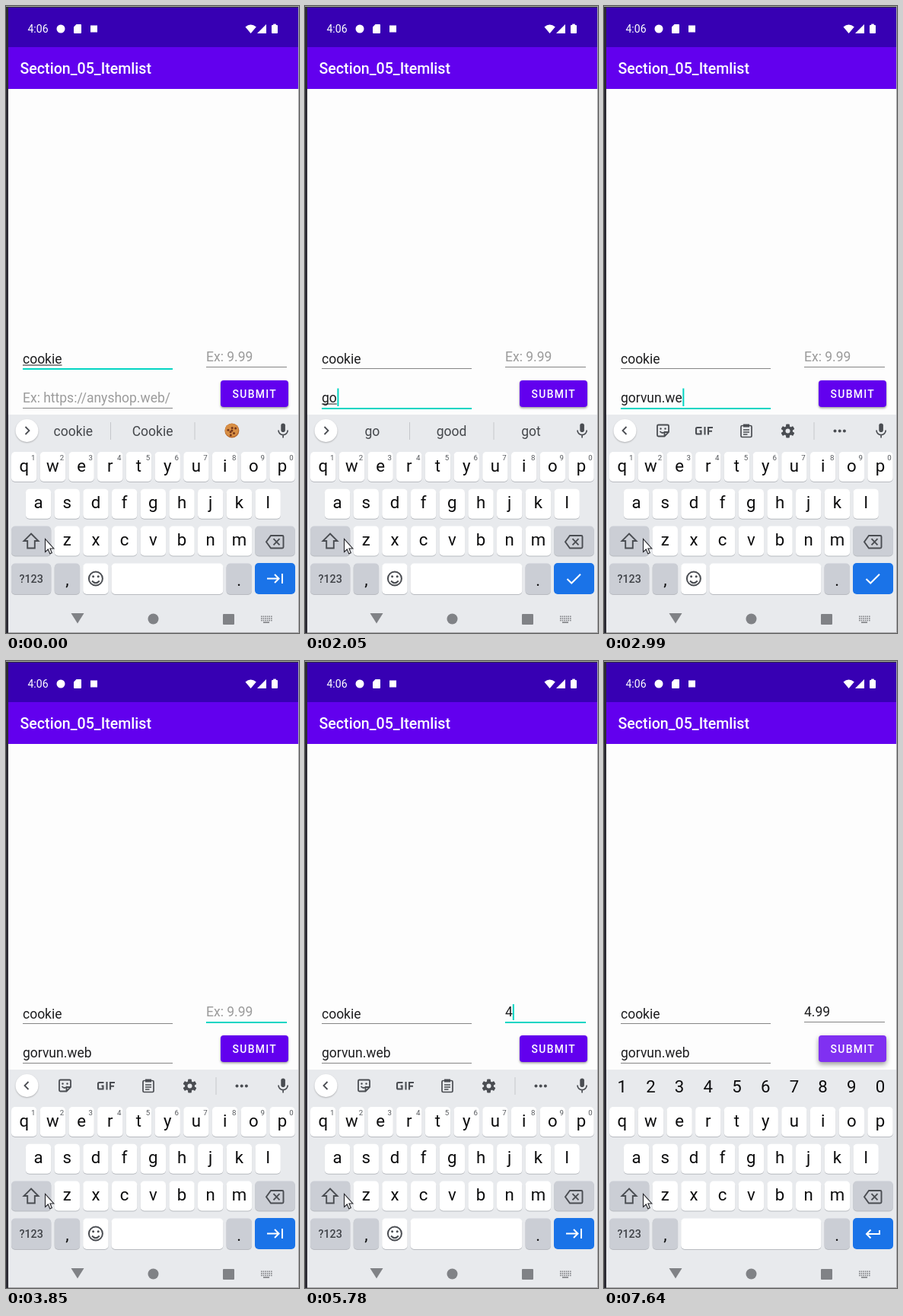
These frames come from a looping animation (385x824 px, 8000 ms). An HTML page with a canvas:

```html
<!DOCTYPE html>
<html lang="en">
<head>
<meta charset="utf-8">
<title>Item list</title>
<style>
html, body { margin: 0; width: 100%; height: 100%; overflow: hidden; background: #fdfdfd; }
canvas { display: block; width: 385px; height: 824px; }
</style>
</head>
<body>
<canvas id="stage"></canvas>
<script>
const W = 385, H = 824, LOOP = 8000;
const canvas = document.getElementById('stage');
const ctx = canvas.getContext('2d');
const dpr = window.devicePixelRatio || 1;
canvas.width = W * dpr;
canvas.height = H * dpr;

const INK = '#1d1d1f', ICON = '#4a4d52', HINT = '#9b9b9b', TEAL = '#03d5c3';
const PURPLE = '#6200ee', PANEL = '#e8eaed', DARK_KEY = '#cbced5', BLUE = '#1a73e8';
const LINK = 'gorvun.web';

// Each step changes part of the state; "words" null shows the toolbar.
const steps = [
  [0, { focus: 'name', link: '', price: '', caret: false, mark: 6, keys: 'next', words: ['cookie', 'Cookie', null] }],
  [500, { caret: true }],
  [1060, { focus: 'link', mark: 0, words: null, keys: 'done' }],
  [1620, { caret: false }],
  [1900, { caret: true, link: LINK.slice(0, 1) }],
  [2050, { link: LINK.slice(0, 2), mark: 2, words: ['go', 'good', 'got'] }],
  [2200, { link: LINK.slice(0, 3), mark: 2, words: ['gor', 'gore', 'gorge'] }],
  [2320, { link: LINK.slice(0, 4), mark: 3 }],
  [2440, { link: LINK.slice(0, 5), mark: 4, words: ['gorv', 'gorvun', 'gorge'] }],
  [2560, { link: LINK.slice(0, 6), mark: 5, words: ['gorvu', 'gorvun', 'Gorvun'] }],
  [2710, { link: LINK.slice(0, 7), mark: 6, words: ['gorvun', 'Gorvun', 'Gorvuns'] }],
  [2990, { link: LINK.slice(0, 9), mark: 0, words: null }],
  [3140, { link: LINK }],
  [3290, { focus: 'price' }],
  [3440, { keys: 'next' }],
  [3850, { caret: false }],
  [4280, { caret: true }],
  [4830, { caret: false }],
  [5380, { caret: true }],
  [5780, { price: '4' }],
  [5900, { price: '4.' }],
  [6370, { caret: false }],
  [6970, { caret: true, price: '4.9' }],
  [7090, { price: '4.99' }],
  [7520, { focus: 'submit' }],
  [7640, { keys: 'enter' }]
];

function stateAt(t) {
  const s = {};
  for (const [at, change] of steps) if (at <= t) Object.assign(s, change);
  return s;
}

const font = (size, weight = 400) => `${weight} ${size}px Roboto, sans-serif`;

function text(str, x, y, size, color, align = 'left', weight = 400) {
  ctx.font = font(size, weight);
  ctx.textAlign = align;
  ctx.fillStyle = color;
  ctx.fillText(str, x, y);
}

function rect(x, y, w, h, color) {
  ctx.fillStyle = color;
  ctx.fillRect(x, y, w, h);
}

function round(x, y, w, h, r, color) {
  ctx.beginPath();
  ctx.roundRect(x, y, w, h, r);
  ctx.fillStyle = color;
  ctx.fill();
}

function disc(x, y, r, color) {
  ctx.beginPath();
  ctx.arc(x, y, r, 0, 7);
  ctx.fillStyle = color;
  ctx.fill();
}

function shape(d, color) {
  ctx.fillStyle = color;
  ctx.fill(new Path2D(d));
}

function line(d, color, width = 2) {
  ctx.strokeStyle = color;
  ctx.lineWidth = width;
  ctx.stroke(new Path2D(d));
}

function shadow(color, blur, dy) {
  ctx.shadowColor = color;
  ctx.shadowBlur = blur * dpr;
  ctx.shadowOffsetY = dy * dpr;
}

const noShadow = () => shadow('transparent', 0, 0);

function drawBars() {
  rect(0, 0, W, H, '#fdfdfd');
  rect(3, 2, 382, 52, '#3700b3');
  rect(3, 54, 382, 55, PURPLE);
  text('4:06', 28.5, 35, 14, '#fff');
  disc(72, 30, 5.5, '#fff');
  shape('M92.5 24H98q1 0 1 1v10q0 1-1 1H90q-1 0-1-1V27.500Z', '#fff');
  rect(111, 25.5, 9, 9, '#fff');
  shape('M314.500 27.500Q321.500 21.500 328.800 27.500L321.600 36Z', '#fff');
  shape('M342 24V36H330Z', '#fff');
  round(349, 25, 8, 11, 1, '#fff');
  rect(351.2, 23.6, 3.6, 2, '#fff');
  text('Section_05_Itemlist', 18.5, 89, 19.6, '#fff', 'left', 500);
}

const fields = {
  name: { x: 22, base: 470, end: 219, rule: 476, top: 451.5, tall: 23.5, pad: 0.6, hint: '' },
  link: { x: 22, base: 521, end: 219, rule: 528, top: 502.5, tall: 23.5, pad: 0.6, hint: 'Ex: https://anyshop.web/' },
  price: { x: 263, base: 467, end: 369, rule: 474, top: 451, tall: 21, pad: 0, hint: 'Ex: 9.99' }
};

function drawField(key, value, s) {
  const f = fields[key], active = s.focus === key;
  ctx.save();
  ctx.beginPath();
  ctx.rect(f.x, f.top - 4, f.end - f.x, 36);
  ctx.clip();
  text(value || f.hint, f.x, f.base, 17.5, value ? INK : HINT);
  const span = str => ctx.measureText(str).width;
  const full = span(value), marked = span(value.slice(0, s.mark));
  ctx.restore();
  if (active) rect(f.x, f.rule, f.end - f.x, 2, TEAL);
  else rect(f.x, f.rule, f.end - f.x, 1, '#858585');
  if (!active) return;
  if (s.mark) rect(f.x, f.base + 1.5, marked, 1, INK);
  if (s.caret) rect(f.x + f.pad + full, f.top, 2, f.tall, TEAL);
}

function drawSubmit(lit) {
  shadow('rgba(0,0,0,.4)', lit ? 6 : 3, lit ? 3 : 1.5);
  round(282, 492, 89, 35, 4, lit ? '#8030f1' : PURPLE);
  noShadow();
  ctx.letterSpacing = '1.3px';
  text('SUBMIT', 297.6, 515, 13.9, '#fff', 'left', 500);
  ctx.letterSpacing = '0px';
}

function key(x, y, w, color = '#fff', h = 39) {
  round(x, y + 1, w, h, 5, '#b8bbc0');
  round(x, y, w, h, 5, color);
}

const keyX = i => 23.7 + i * 37.7;

function drawMic() {
  round(361.3, 548.5, 5.6, 11.5, 2.8, ICON);
  line('M358 557.500a6.100 6.100 0 0 0 12.200 0M364.100 563.500V567.500', ICON, 1.7);
}

function drawCookie(x, y) {
  disc(x, y, 9.5, '#b8682c');
  disc(x - 0.3, y - 0.6, 8.7, '#d88f45');
  for (let i = 0; i < 7; i++) {
    const a = i * 2.4, r = 2.5 * Math.sqrt(i);
    disc(x + r * Math.cos(a), y + r * Math.sin(a), 1.5, '#74361b');
  }
}

function drawStrip(words) {
  shadow('rgba(0,0,0,.25)', 2, 1);
  disc(27.5, 558, 15, '#fff');
  noShadow();
  line(words ? 'M25.500 553L30.500 558L25.500 563' : 'M29.500 553L24.500 558L29.500 563', ICON, 1.8);
  drawMic();
  if (words) {
    rect(137, 547, 1, 23, '#c5c7cb');
    rect(247.5, 547, 1, 23, '#c5c7cb');
    words.forEach((word, i) => {
      const x = 88.3 + i * 104.3;
      if (word) text(word, x, 565, 17.5, '#45484c', 'center');
      else drawCookie(x, 558);
    });
    return;
  }
  // sticker
  line('M71.500 550.500H83.500q1.500 0 1.500 1.500V560L79.500 565.500H71.500q-1.500 0-1.500-1.500V552q0-1.500 1.500-1.500ZM85 560H81q-1.500 0-1.500 1.500V565.500M73.500 559q3.500 4 7 0', ICON, 1.8);
  disc(74.5, 555.5, 1.2, ICON);
  disc(80.5, 555.5, 1.2, ICON);
  // animated picture button
  line('M128.500 554H122.500q-1.500 0-1.500 1.500V561q0 1.500 1.500 1.500H127.500V558.500H125.500M132.500 553V563.500M137 563.500V554H143M137 558.700H142', ICON, 2.1);
  // clipboard
  line('M181.500 551.500H192.500q1.500 0 1.500 1.500V565q0 1.500-1.500 1.500H181.500q-1.500 0-1.500-1.500V553q0-1.500 1.500-1.500ZM183 557H191M183 560H191M183 563H188.500', ICON, 1.7);
  rect(183, 549.5, 8, 4, ICON);
  // gear
  for (let i = 0; i < 6; i++) {
    ctx.save();
    ctx.translate(241.5, 558.5);
    ctx.rotate(i * Math.PI / 3);
    round(-2.4, -9, 4.8, 6, 1, ICON);
    ctx.restore();
  }
  disc(241.5, 558.5, 6.5, ICON);
  disc(241.5, 558.5, 3, PANEL);
  rect(275.5, 547, 1, 23, '#c5c7cb');
  for (const x of [303.5, 309.7, 315.9]) disc(x, 558.5, 2, ICON);
}

function drawAction(kind) {
  round(327, 732, 53, 41, 5, BLUE);
  line({
    next: 'M343 752.500H358.500M353 747L358.500 752.500L353 758M363 746V759',
    done: 'M344.500 753L350.200 758.500L362 746.800',
    enter: 'M362 748V753H345.500M350.500 747.500L345 753L350.500 758.500'
  }[kind], '#fff', 2);
}

function drawKeyboard(s) {
  const plain = s.keys === 'enter';
  rect(3, 537, 382, 287, PANEL);
  if (!plain) drawStrip(s.words);

  const label = (c, x, y) => text(c, x, y, 22.2, '#0c0c0d', 'center');
  const row = (letters, first, y) => [...letters].forEach((c, i) => {
    const x = keyX(first + i);
    key(x - 16.7, y, 33.4);
    label(c, x, Math.floor(y + 26));
  });
  row('qwertyuiop', 0, 586);
  row('asdfghjkl', 0.5, 634.7);
  row('zxcvbnm', 1.5, 683.5);
  [...'1234567890'].forEach((d, i) => {
    if (plain) label(d, keyX(i), 567);
    else text(d, keyX(i) + 12, 596.5, 9.7, '#55585c', 'center');
  });

  key(7, 683.5, 52.3, DARK_KEY);
  line('M33 693.500L42.500 703H37.800V712.500H28.200V703H23.500Z', ICON, 1.9);
  key(327.3, 683.5, 52.5, DARK_KEY);
  line('M348 696H363q1.500 0 1.500 1.500V711q0 1.500-1.500 1.500H348L342 704.250ZM351.500 700.200L359.500 708.300M359.500 700.200L351.500 708.300', ICON, 1.9);

  key(7, 732.5, 52.3, DARK_KEY, 40.5);
  text('?123', 33.2, 758, 14.3, '#3f4247', 'center', 500);
  key(63.7, 732.5, 33.4, DARK_KEY, 40.5);
  label(',', 80.5, 761);
  if (plain) {
    key(101.2, 732.5, 184.2, '#fff', 40.5);
  } else {
    key(101.2, 732.5, 33.4, '#fff', 40.5);
    line('M126.900 752.500a9 9 0 1 1-18 0a9 9 0 1 1 18 0M113 755.500q4.900 5.500 9.800 0', ICON, 2);
    disc(114.6, 749.7, 1.5, ICON);
    disc(121.2, 749.7, 1.5, ICON);
    key(138.5, 732.5, 146.9, '#fff', 40.5);
  }
  key(289.6, 732.5, 33.4, DARK_KEY, 40.5);
  label('.', 306.3, 762);
  drawAction(s.keys);
}

function drawNav() {
  const grey = '#808286';
  shape('M85.500 798H102.500L94 811.500Z', grey);
  disc(193.5, 805.5, 7, grey);
  round(285, 799, 15, 14, 1, grey);
  for (let r = 0; r < 3; r++)
    for (let c = 0; c < 6; c++) rect(335 + c * 2.6, 801.5 + r * 2.6, 1.6, 1.6, grey);
  rect(338, 809.3, 8, 1.6, grey);
}

function drawPointer() {
  const d = 'M51.500 700.500V717.500L55.300 714L57.700 719.800L60.300 718.700L57.900 713H62.800Z';
  shape(d, '#fff');
  line(d, '#26262b', 1.1);
}

function drawEdges() {
  const frame = '#a8a8ab';
  rect(0, 0, W, 2, '#32313a');
  rect(0, 0, W, 1, frame);
  rect(0, 1, 3, H, '#2c2b33');
  rect(384, 0, 1, H, frame);
  rect(3, 823, 382, 1, frame);
}

function draw(now) {
  const s = stateAt(now % LOOP);
  ctx.setTransform(dpr, 0, 0, dpr, 0, 0);
  drawBars();
  drawField('name', 'cookie', s);
  drawField('price', s.price, s);
  drawField('link', s.link, s);
  drawSubmit(s.focus === 'submit');
  drawKeyboard(s);
  drawNav();
  drawEdges();
  drawPointer();
}

const start = performance.now();
function tick() {
  draw(performance.now() - start);
  requestAnimationFrame(tick);
}
tick();
</script>
</body>
</html>
```
